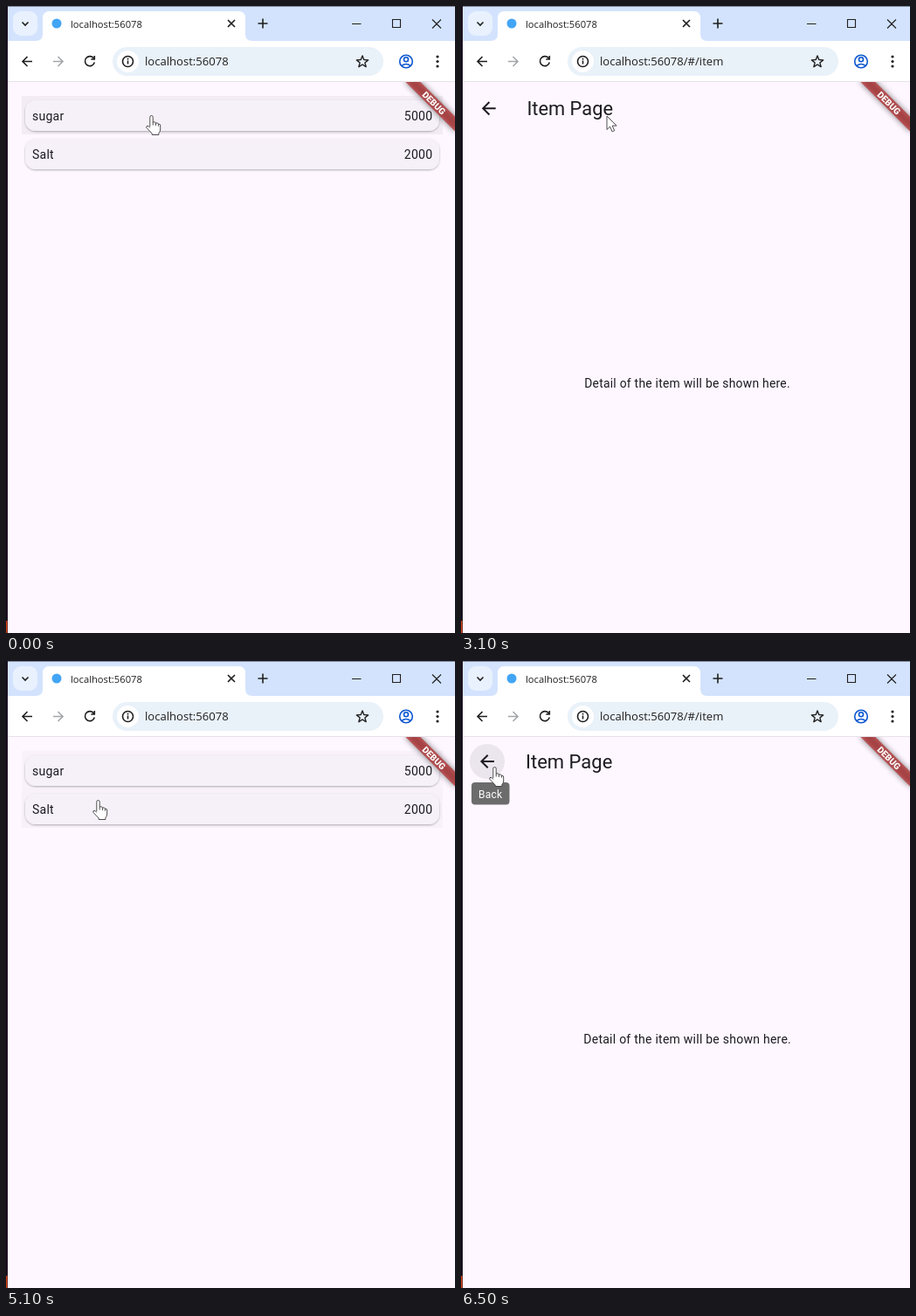
Write an HTML page that moves like this. It is 514 px wide and 718 px high and loops after 8 s.

```html
<!DOCTYPE html>
<html lang="en">
<head>
<meta charset="utf-8">
<title>Item list</title>
<style>
  html, body { margin: 0; width: 100%; height: 100%; overflow: hidden; background: #fef7ff; }
  svg { display: block; width: 514px; height: 718px; }
  .chrome { font-family: "Open Sans", "Noto Sans", sans-serif; fill: #1f1f1f; }
  .app { font-family: Roboto, Arial, sans-serif; fill: #1d1b20; }
  .body { font-size: 14px; letter-spacing: .25px; }
  .line { fill: none; stroke: #1f1f1f; stroke-width: 1.6; }
  .thin { fill: none; stroke: #1f1f1f; stroke-width: 1.1; }
  .pointer { fill: #fff; stroke: #3a3a3a; stroke-width: .9; stroke-linejoin: round; }
</style>
</head>
<body>
<svg viewBox="0 0 514 718">
  <defs>
    <clipPath id="view"><rect x="2" y="87" width="512" height="631"/></clipPath>
    <clipPath id="row"><rect x="18" y="103" width="482" height="44"/></clipPath>
    <filter id="cardShadow" x="-5%" y="-30%" width="110%" height="170%">
      <feDropShadow dx="0" dy="1" stdDeviation=".9" flood-color="#000" flood-opacity=".3"/>
    </filter>
    <filter id="blur" x="-30%" y="-150%" width="160%" height="400%"><feGaussianBlur stdDeviation="3.6"/></filter>
  </defs>

  <rect width="514" height="718" fill="#fef7ff"/>

  <g clip-path="url(#view)">
    <g id="list" class="app body"></g>
    <g id="page" class="app">
      <rect x="2" y="87" width="512" height="631" fill="#fef7ff"/>
      <circle id="backHover" cx="30" cy="115" r="20" fill="#49454f" fill-opacity=".1"/>
      <path transform="translate(18 103)" d="M20 11H7.83l5.59-5.59L12 4l-8 8 8 8 1.41-1.41L7.83 13H20z"/>
      <text x="74" y="123" font-size="22">Item Page</text>
      <text class="body" x="140.3" y="437.5">Detail of the item will be shown here.</text>
    </g>
    <g id="tooltip" class="app">
      <rect x="12" y="139" width="43.5" height="25.5" rx="4" fill="#616161" fill-opacity=".92"/>
      <text x="20" y="156.6" font-size="12" letter-spacing=".25" style="fill:#fff">Back</text>
    </g>
    <g transform="translate(514 87) rotate(45)">
      <rect x="-40" y="28" width="80" height="12" opacity=".5" filter="url(#blur)"/>
      <rect x="-40" y="28" width="80" height="12" fill="#b71c1c" fill-opacity=".63"/>
      <text class="app" y="37.7" font-size="10.2" font-weight="900" text-anchor="middle" style="fill:#fff">DEBUG</text>
    </g>
  </g>

  <g class="chrome">
    <rect width="514" height="41" fill="#d3e3fd"/>
    <rect width="514" height="1" fill="#7f8aa0"/>
    <rect y="40" width="514" height="46" fill="#fff"/>
    <rect y="86" width="514" height="1" fill="#e6e3e8"/>
    <rect x="8" y="6" width="28" height="28" rx="9" fill="#e9f1fe"/>
    <path class="line" d="M18.5 18.5l3.5 3.5 3.5-3.5"/>
    <path d="M34 40q8 0 8-8V14q0-8 8-8H266q8 0 8 8V32q0 8 8 8z" fill="#fff"/>
    <circle cx="58" cy="20" r="5.5" fill="#42a5f5"/>
    <text x="74" y="24.6" font-size="11.2">localhost:56078</text>
    <path class="line" d="M254 16l8 8m0-8l-8 8"/>
    <path class="line" stroke-width="1.4" d="M288.5 20h11M294 14.500v11"/>
    <path class="thin" d="M396 20.500h10.500M442.500 15.500h9v9h-9zM488 15.500l10 10m0-10l-10 10"/>

    <path id="goBack" class="line" d="M30 63.500H19m5.500-5.500l-5.500 5.500 5.500 5.500"/>
    <path class="line" style="stroke:#a3a6aa" d="M54 63.500h11m-5.500-5.500l5.500 5.500-5.500 5.500"/>
    <path class="line" d="M100.500 60a5.500 5.500 0 1 0 .8 4.500M101.300 57v4h-4"/>
    <rect x="122" y="47" width="310" height="33" rx="16.500" fill="#e9f1f9"/>
    <circle cx="139.500" cy="63.500" r="12.500" fill="#fff"/>
    <circle class="line" cx="139.500" cy="63.500" r="6"/>
    <path class="line" d="M139.500 62.500v4M139.500 59.800v1.600"/>
    <text id="url" x="159" y="68" font-size="13.100"></text>
    <path id="star" class="line" stroke-linejoin="round" style="stroke-width:1.400"/>
    <g class="line" style="stroke:#0b57d0">
      <circle cx="458" cy="63.500" r="7.300"/>
      <circle cx="458" cy="61.300" r="2.500"/>
      <path d="M452.800 68.600q5.200-4.200 10.400 0"/>
    </g>
    <g><circle cx="494" cy="58" r="1.600"/><circle cx="494" cy="63.500" r="1.600"/><circle cx="494" cy="69" r="1.600"/></g>
  </g>

  <rect width="2" height="718" fill="#1b1020"/>
  <rect y="704" width="1.500" height="14" fill="#d8461f"/>

  <path id="arrow" class="pointer" d="M0 0V15.500l3.600-3.400 2.500 5.700 2.600-1.100-2.500-5.600h4.900z"/>
  <path id="hand" class="pointer" d="M-2.200 12V1.200a1.700 1.700 0 0 1 3.400 0V7q2.800-1 3.200 1 2.600-.7 3 1.200 2.300-.4 2.300 1.800V15q0 3-1.800 4.500V21.500H.2V20L-6 13.500q-.8-2 1-2.300 1.300 0 2.800 2.300M1.200 7v3.500M4.400 8v3M7.400 9.200v2.500"/>
</svg>

<script>
const LOOP = 8000, STEP = 100, TRANSITION = 300;
const $ = id => document.getElementById(id);
const clamp = v => Math.max(0, Math.min(1, v));
const ramp = (t, from, to) => clamp((t - from) / (to - from));
const within = (t, from, to) => t >= from && t < to;

const PUSHES = [2941, 5462], POP = 4780;

// time, x, y of the pointer's hot spot
const POINTER = [
  [0, 167, 126], [3700, 167, 126], [3800, 146, 128], [3900, 92, 131], [4000, 49, 129],
  [4100, 43, 127], [4700, 43, 127], [4800, 47, 130], [4900, 66, 139], [5100, 106, 160],
  [5400, 127, 177], [5700, 127, 177], [5800, 121, 174], [6000, 76, 149], [6200, 43, 126],
  [6400, 39, 122]
];

const rows = [["sugar", "5000"], ["Salt", "2000"]];
$("list").innerHTML = rows.map(([name, price], i) => `
  <g transform="translate(0 ${i * 44})">
    <rect id="hover${i}" x="18" y="103" width="482" height="44" fill-opacity=".045" fill="#000"/>
    <g clip-path="url(#row)"><circle id="splash${i}" cy="${i ? 133 : 126}" fill="#000"/></g>
    <rect x="22" y="108" width="474" height="35" rx="12" fill="#f6f1f9" filter="url(#cardShadow)"/>
    <text x="30" y="131">${name}</text>
    <text x="488.300" y="131" text-anchor="end">${price}</text>
  </g>`).join("");

$("star").setAttribute("d", "M" + Array.from({ length: 10 }, (_, i) => {
  const a = i * Math.PI / 5, r = i % 2 ? 3 : 7;
  return [408 + r * Math.sin(a), 64 - r * Math.cos(a)].map(v => v.toFixed(2));
}).join("L") + "z");

function bezier(x1, y1, x2, y2) {
  const at = (a, b, s) => 3 * (1 - s) ** 2 * s * a + 3 * (1 - s) * s * s * b + s ** 3;
  return x => {
    let lo = 0, hi = 1;
    for (let i = 0; i < 24; i++) {
      const mid = (lo + hi) / 2;
      if (at(x1, x2, mid) < x) lo = mid; else hi = mid;
    }
    return at(y1, y2, lo);
  };
}
const zoomStart = bezier(.05, 0, .133, .06), zoomEnd = bezier(.208, .82, .25, 1);
const zoom = k => k < 1 / 6 ? .4 * zoomStart(k * 6) : .4 + .6 * zoomEnd((k - 1 / 6) * 1.2);

function pointerAt(t) {
  const n = POINTER.findIndex(p => p[0] > t);
  if (n < 0) return POINTER[POINTER.length - 1].slice(1);
  const a = POINTER[n - 1], b = POINTER[n], k = ramp(t, a[0], b[0]);
  return [a[1] + (b[1] - a[1]) * k, a[2] + (b[2] - a[2]) * k];
}

function place(el, scale, opacity) {
  el.setAttribute("transform", `translate(258 402.5) scale(${scale}) translate(-258 -402.5)`);
  el.setAttribute("opacity", opacity);
}

function splash(i, x, alpha, radius) {
  const el = $("splash" + i);
  el.setAttribute("cx", x);
  el.setAttribute("r", radius);
  el.setAttribute("fill-opacity", alpha);
}

function transition(t) {
  const popping = within(t, POP, PUSHES[1]);
  const start = popping ? POP : t < POP ? PUSHES[0] : PUSHES[1];
  const k = ramp(t, start, start + TRANSITION), p = zoom(k);
  if (popping) {
    place($("list"), 1.1 - .1 * p, 1);
    place($("page"), 1 - .1 * p, 1 - ramp(k, .0825, .2075));
  } else {
    place($("list"), 1 + .05 * p, 1);
    place($("page"), .85 + .15 * p, ramp(k, .125, .25));
  }
}

function draw(t) {
  transition(t);

  const itemOpen = within(t, PUSHES[0], POP) || t >= PUSHES[1];
  $("url").textContent = "localhost:56078" + (itemOpen ? "/#/item" : "");

  const sugar = t < 3100 ? 1 : within(t, 4900, 5100) ? .8 : t === 5100 ? .4 : 0;
  const salt = t < 5100 ? 0 : t === 5100 ? .5 : 1;
  $("hover0").setAttribute("opacity", sugar);
  $("hover1").setAttribute("opacity", salt);
  splash(0, 172, within(t, 2900, 3100) ? .05 : 0, 87);
  splash(1, 127, within(t, 5400, 5700) ? .05 : 0, t < 5500 ? 30 : 87);

  const overBack = within(t, 4000, 4900) || t >= 6200;
  $("backHover").setAttribute("opacity", overBack ? 1 : 0);
  const tip = t < 5000 ? ramp(t, 3940, 4090) - ramp(t, 4740, 4815) : ramp(t, 6150, 6300);
  $("tooltip").setAttribute("opacity", tip);

  const isHand = t < 2900 || within(t, 4000, 4800) || within(t, 4900, 5500) || t >= 6200;
  const [x, y] = pointerAt(t);
  $("arrow").setAttribute("transform", `translate(${x} ${y})`);
  $("hand").setAttribute("transform", `translate(${x} ${y})`);
  $("arrow").setAttribute("visibility", isHand ? "hidden" : "visible");
  $("hand").setAttribute("visibility", isHand ? "visible" : "hidden");
}

function frame() {
  const t = performance.now() % LOOP;
  draw(Math.floor(t / STEP) * STEP);
  requestAnimationFrame(frame);
}
frame();
</script>
</body>
</html>
```
